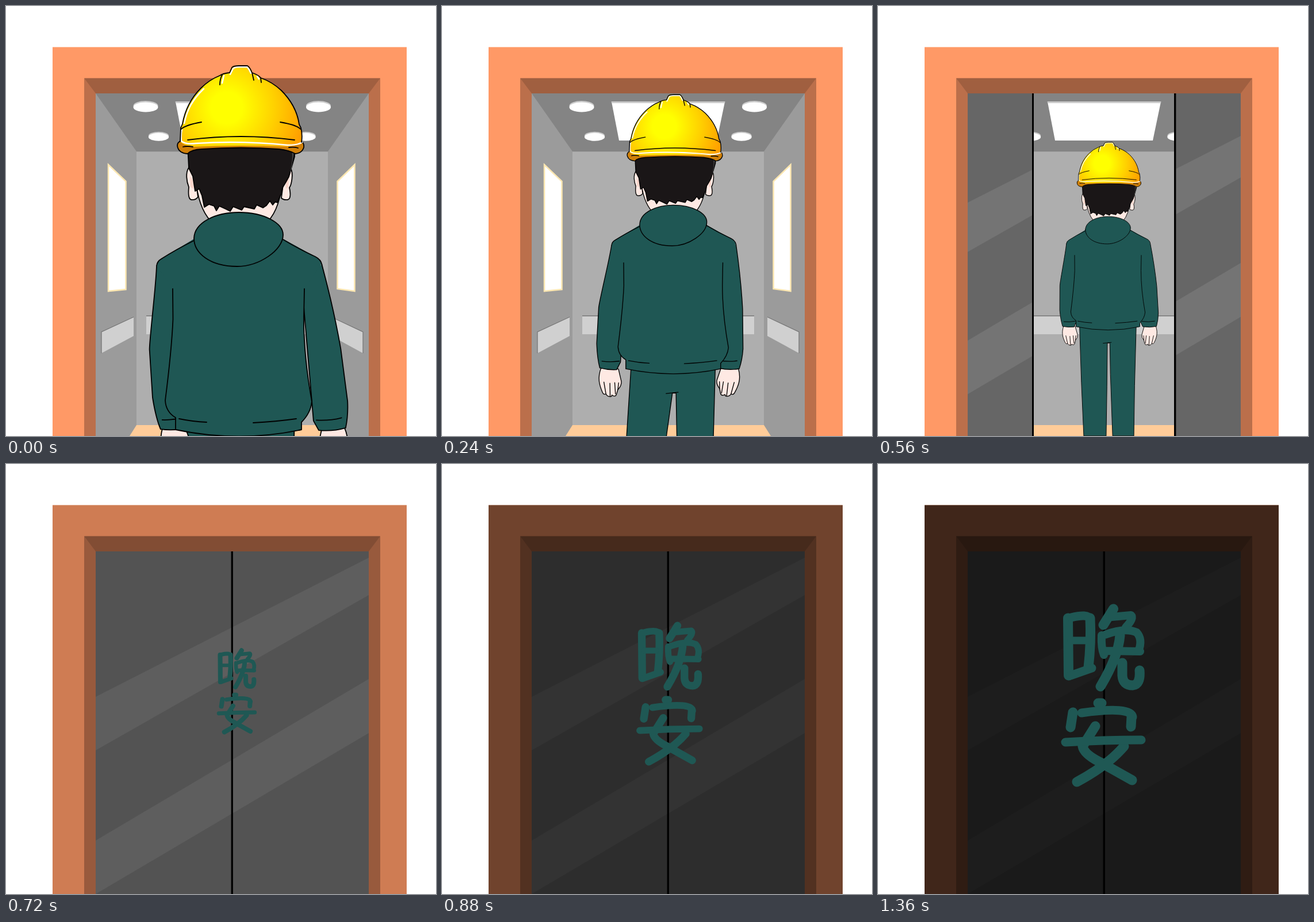
Write an HTML page that moves like this. It is 748 px wide and 748 px high and loops after 1.6 s.

```html
<!DOCTYPE html>
<html lang="zh">
<head>
<meta charset="utf-8">
<title>晚安</title>
<style>
  html, body { margin: 0; height: 100%; overflow: hidden; background: #fff; }
  svg { display: block; width: 100vw; height: 100vh; }
  .line { fill: none; stroke: #000; }
  .man { stroke: #000; stroke-width: 1.8; stroke-linejoin: round; stroke-linecap: round; }
  .cloth { fill: #1f5754; }
  .skin { fill: #fee9e3; }
  .bare { stroke: none; }
  .shine { fill: none; stroke: #fff; stroke-width: 2.5; }
  .words { fill: none; stroke: #1f5854; stroke-width: 17; stroke-linecap: round; stroke-linejoin: round; }
</style>
</head>
<body>
<svg viewBox="0 0 748 748">
  <defs>
    <radialGradient id="shell" gradientUnits="userSpaceOnUse" cx="384" cy="177" r="136">
      <stop offset=".2" stop-color="#ff0"/>
      <stop offset=".6" stop-color="#ffd200"/>
      <stop offset="1" stop-color="#ffa000"/>
    </radialGradient>
    <clipPath id="opening"><path d="M156 152H631V748H156z"/></clipPath>
    <clipPath id="leftHalf"><path d="M156 152H394.500V748H156z"/></clipPath>
    <clipPath id="rightHalf"><path d="M391.500 152H631V748H391.500z"/></clipPath>
    <g id="lamp"><ellipse cy="-1.500" rx="21.500" ry="8.500" fill="#ccc"/><ellipse cy="1" rx="21.500" ry="8.500" fill="#fff"/></g>
    <g id="panels">
      <path fill="#666" d="M156 152H631V748H156z"/>
      <path fill="#747474" d="M156 405L631 163V228L156 498zM156 655L631 374V468L156 748z"/>
      <path fill="none" stroke="#000" stroke-width="3.400" d="M393.200 152V748"/>
    </g>
    <g id="hand">
      <path class="skin" d="M252 736C244 759 250 776 258 792Q261 798 266 795Q269 801 276 801Q280 801 280 797Q287 802 290 796L293 784Q302 774 300 764L292 736z"/>
      <path class="line" d="M260 768L266 795M274 770L276 800M285 768L288 794M293 784L294 768"/>
    </g>
  </defs>

  <path fill="#f96" d="M81 71.500H697V748H81z"/>
  <path fill="#bb6f4b" d="M136 126H651V748H136z"/>
  <path fill="#a05f40" d="M136 125.500H651L631 152H156z"/>
  <path fill="#9b9b9b" d="M156 152H631V748H156z"/>
  <path fill="#848484" d="M156 152H631L560 253H227z"/>
  <path fill="#aeaeae" d="M227 253.500H560V730H227z"/>
  <path fill="#fc9" d="M227 729H560L572 748H215z"/>
  <use href="#lamp" x="243" y="175"/>
  <use href="#lamp" x="543.500" y="175"/>
  <use href="#lamp" transform="translate(265.500 227) scale(.82)"/>
  <use href="#lamp" transform="translate(521 227) scale(.82)"/>
  <path fill="#fff" d="M295 167H492L478 234H308z"/>
  <path fill="#ccc" d="M294.500 166H492.500L492 169H295z"/>
  <path fill="#fff" stroke="#fbe6b0" stroke-width="2.500" d="M178 276L208.500 305V493L178 496zM606.500 276L576.500 305V492L606.500 496z"/>
  <path fill="#d0d0d0" d="M166 567L222 541V574L166 604zM621 567L566 541V574L621 604zM244 539H543V571H244z"/>
  <path fill="none" stroke="#777" stroke-width="1.300" d="M166 604V567L222 541M621 604V567L566 541M244 539H543"/>

  <g id="man" class="man">
    <path id="legs" class="cloth"/>
    <path class="line" d="M388 794L416 791"/>
    <g id="leftArm">
      <use href="#hand"/>
      <path class="cloth" d="M262 452C258 490 242 570 239.500 596L239 680Q242 715 249 736Q268 740 288 738L296 720L300 460"/>
      <path class="line" d="M253 720Q272 722 293 718"/>
    </g>
    <g id="rightArm">
      <use href="#hand" transform="translate(821) scale(-1 1)"/>
      <path class="cloth" d="M549.500 450Q565 530 572 598L577.500 690Q577 715 571 736Q548 741 524 737L516 720L512 460"/>
      <path class="line" d="M521 719Q545 722 565 718"/>
    </g>
    <path class="cloth bare" d="M327 405L270 440Q263 444 262 452L290 492V545Q288 600 277 686Q278 706 295 716V737Q405 760 514 737V724Q532 706 532 688Q518 610 518 545L519 492L549 448Q547 441 538 436L480 404z"/>
    <path class="line" d="M327 408Q295 424 270 440Q263 444 262 452M480 405Q508 422 538 436Q548 441 549.500 450M290 492L290.500 545Q288 600 277 686Q278 706 295 716V737Q405 760 514 737V724Q530 708 532 688Q518 610 518 545L519 492M301 718Q325 723 349 724M430 725Q470 723 505 718"/>
    <path class="skin" d="M330 300Q334 350 356 374H456Q477 352 481 300z"/>
    <path class="skin" d="M318 281C312 290 314 305 318 315Q316 335 322 337Q330 338 334 332L328 290zM495 282C501 292 496 312 493 316Q497 335 490 337Q483 338 479 334L484 295z"/>
    <path fill="#fbd5ca" class="bare" d="M320 296Q328 305 326 318L321 315zM492 296Q485 305 487 318L491 315z"/>
    <path fill="#1a1617" d="M316 244L317 262L318 282L325 296L329 322L336 318L341 330L345 350L353 345L362 348L366 356L371 348L382 353L390 357L395 349L410 355L414 349L432 353L436 346L447 351L453 347L459 339L464 346L468 341L472 342L479 326L481 316L487 306L492 297L498 276L502 262V244z"/>
    <path fill="#484848" class="bare" d="M501 250L497 282L493 292Q500 270 497 250z"/>
    <path class="cloth" d="M327 404C328 376 365 359 405 359C450 359 482 378 482 398C482 425 440 453 402 453C355 453 327 430 327 404z"/>

    <path fill="#d08008" d="M303 235Q296 239 299 247Q302 256 316 257Q322 250 340 249Q410 244 475 249Q493 251 503 257Q515 256 518 246Q519 238 513 235z"/>
    <path id="crown" fill="url(#shell)" class="bare" d="M303 236L304 212L307 205C311 183 320 162 339 143Q354 128 372 121Q378 117 389 116L393 107Q396 104 405 104H420Q424 106 428 116Q441 121 443 125Q463 132 479 147C497 165 507 185 510 206L513 212Q516 224 514 237Q506 243 490 245Q408 241 325 245Q309 243 303 236z"/>
    <path class="shine" d="M306 214Q304 224 305 235Q312 241 330 239Q408 234 490 242Q508 242 515 237M310 204C315 180 325 162 344 144M376 134L379 121M390 119L395 109Q398 106 405 106H419Q422 108 426 117M440 127L437 122"/>
    <path class="line" d="M303 236L304 212L307 205C311 183 320 162 339 143Q354 128 372 121Q378 117 389 116L393 107Q396 104 405 104H420Q424 106 428 116Q441 121 443 125Q463 132 479 147C497 165 507 185 510 206L513 212Q516 224 514 237M372 137Q372 127 376 120M443 125L444 133M428 116L431 129M305 214Q312 207 340 202M512 214Q506 207 477 202M316 233Q408 221 502 233M308 245Q315 243 325 245M492 246Q502 245 508 247"/>
  </g>

  <g clip-path="url(#opening)">
    <g id="leftDoor"><use href="#panels" clip-path="url(#leftHalf)"/></g>
    <g id="rightDoor"><use href="#panels" clip-path="url(#rightHalf)"/></g>
  </g>
  <path id="shade" d="M81 71.500H697V748H81z"/>

  <g id="words" class="words" role="img" aria-label="晚安">
    <path d="M330.500 268L331.500 368M369 268Q371 310 366 354"/>
    <path stroke-width="15" d="M336 267Q365 260 368 269M335 368L372 355"/>
    <path stroke-width="13" d="M336 307H362"/>
    <path d="M409.500 252L392 280M421 298Q418 335 387 387M425 346V368Q426 385 443 385Q457 384 455 359"/>
    <path stroke-width="14" d="M407 266L440 263Q446 268 431 284M389 298Q388 320 393 332M395 297Q430 284 450 293Q461 305 453 326M396 325L456 326"/>
    <path d="M383 416L389 416M339 432L335 458M441 440L440 457M378 456L356 491Q358 504 385 518L442 550M428 491Q400 524 346 553"/>
    <path stroke-width="15" d="M354 433Q440 421 443 440M326 484Q392 480 458 480"/>
  </g>
</svg>
<script>
  const STEP = 80, LOOP = 1600;
  const el = id => document.getElementById(id);
  const clamp = (v, lo, hi) => Math.min(hi, Math.max(lo, v));
  const move = (id, value) => el(id).setAttribute('transform', value);

  function drawMan(step) {
    const n = Math.min(step, 6);
    const scale = 1 - .0822 * n;
    const x = 408.5 - 1.08 * n;
    const y = 104 + 133 * n / 6 - .6 * n * (6 - n) ** 2;
    const stride = -Math.cos(n * Math.PI / 4);
    const bend = 27 * stride;
    move('man', `translate(${x} ${y}) scale(${scale}) translate(-408.5 -104)`);
    move('leftArm', `rotate(${4 * stride} 262 452)`);
    move('rightArm', `rotate(${4 * stride} 549.5 450)`);
    el('legs').setAttribute('d', `M307 735L${313.5 - bend} 930L${321.5 - bend / 2} 1112
      H${398.5 - bend / 2}L${401 - bend} 942L402.5 793H411L413 900L420.5 1112H493.5L496 940L501.5 735z`);
  }

  function drawWords(n) {
    const scale = n < 13 ? 1.1 - .157 * (13 - n) : 1.1 - .025 * (Math.min(n, 17) - 13);
    el('words').style.display = n < 9 ? 'none' : '';
    move('words', `translate(410 389) scale(${scale}) translate(-410 -389)`);
  }

  function draw(now) {
    const n = Math.floor(now % LOOP / STEP);
    const gap = clamp((8 - n) * 123.5, 0, 247);
    drawMan(n);
    move('leftDoor', `translate(${-gap})`);
    move('rightDoor', `translate(${gap})`);
    el('shade').setAttribute('opacity', clamp((n - 8) * .1875, 0, .75));
    drawWords(n);
    requestAnimationFrame(draw);
  }
  draw(0);
</script>
</body>
</html>
```
